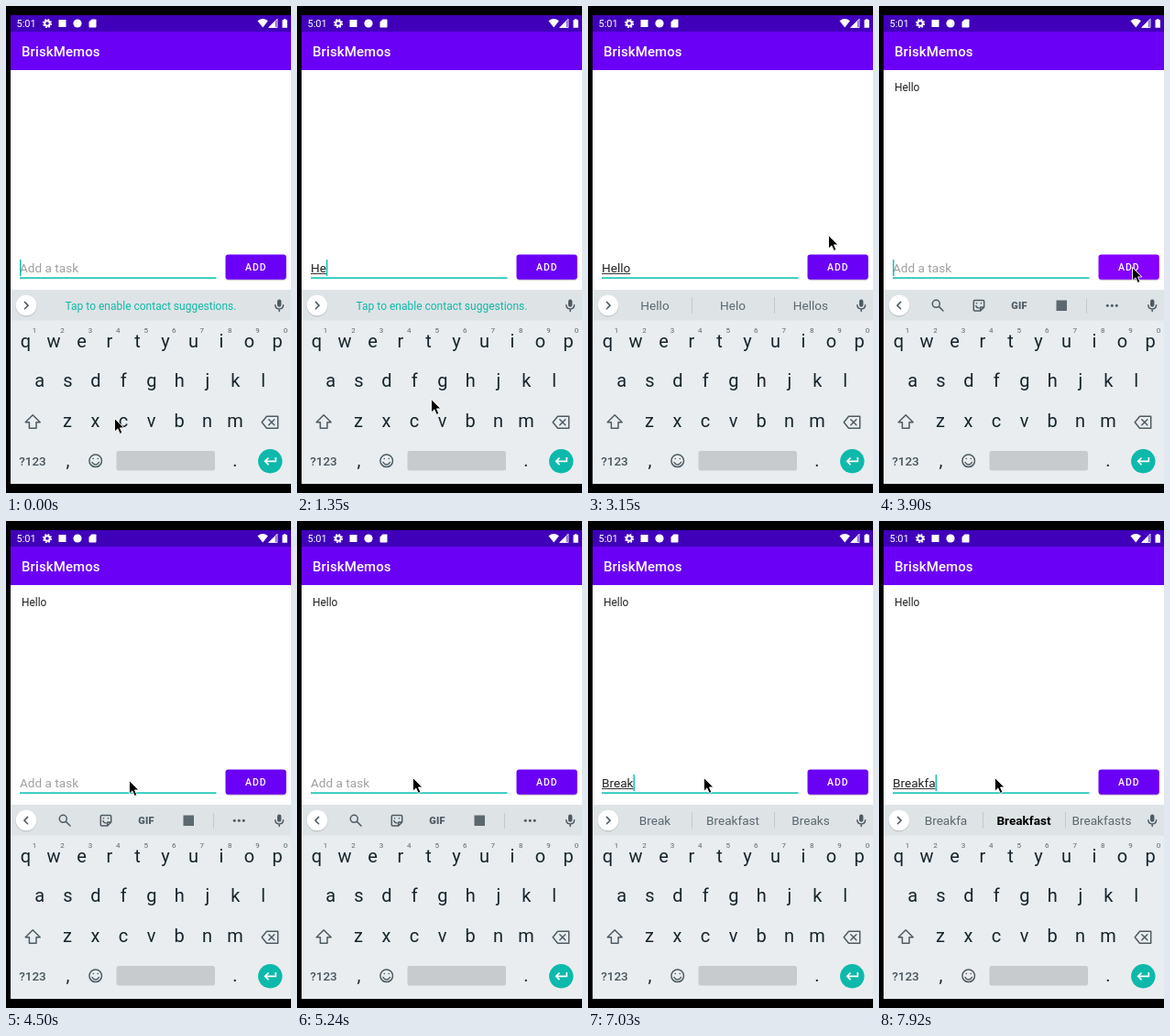
An HTML page that plays this animation: 311 by 532 pixels, repeating every 8000 ms.

```html
<!DOCTYPE html>
<html lang="en">
<head>
<meta charset="utf-8">
<title>Task list</title>
<style>
  html, body { margin: 0; width: 100%; height: 100%; overflow: hidden; background: #000; }
  svg { display: block; width: 311px; height: 532px; font-family: Roboto, "Noto Sans", sans-serif; }
  .mid { text-anchor: middle; }
  .key { font-size: 20px; fill: #17252c; }
  .num { font-size: 8px; fill: #56646b; }
  .word { font-size: 13.6px; fill: #5a686f; }
  .word.best { font-weight: 700; fill: #000; }
  .line { fill: none; stroke: #4d5b62; stroke-width: 1.5; stroke-linejoin: round; stroke-linecap: round; }
  .input { font-size: 13.6px; }
</style>
</head>
<body>
<svg viewBox="0 0 311 532">
  <rect width="311" height="532"/>
  <rect x="5" y="10" width="306" height="512" fill="#fff"/>
  <rect x="5" y="28" width="306" height="42" fill="#6b00f6"/>
  <rect x="5" y="10" width="306" height="18" fill="#4000ba"/>

  <!-- status bar -->
  <g fill="#fff">
    <text x="11.5" y="23" font-size="11">5:01</text>
    <circle cx="45" cy="19" r="2.8" fill="none" stroke="#fff" stroke-width="2"/>
    <circle cx="45" cy="19" r="4.3" fill="none" stroke="#fff" stroke-width="1.5" stroke-dasharray="1.9 1.477"/>
    <rect x="57.5" y="15" width="8" height="8"/>
    <circle cx="78" cy="19" r="4.6"/>
    <path d="M93.5 14.5h4.2q.8 0 .8 .8v7.4q0 .8-.8 .8h-6.4q-.8 0-.8-.8v-5.2z"/>
    <path d="M274.5 16.2q5.7-4.2 11.4 0l-5.7 7.3z"/>
    <path d="M296 14.2v9.3h-9.3z" fill-opacity=".35"/>
    <path d="M294 16.2v7.3h-7.3z"/>
    <path d="M296 14.2v9.3h-9.3z" fill="none" stroke="#fff" stroke-width=".8"/>
    <path d="M301.5 15.3h1.4v-1.1h2.6v1.1h1.4v8.4h-5.4z"/>
  </g>
  <text x="17" y="55" font-size="15" font-weight="500" fill="#fff" letter-spacing=".1">BriskMemos</text>

  <!-- list and entry field -->
  <text id="item" x="17" y="92.5" font-size="11.9" fill="#222">Hello</text>
  <text id="hint" class="input" x="15" y="291" fill="#a0a0a0">Add a task</text>
  <text id="typed" class="input" x="15" y="291" fill="#222"></text>
  <rect id="under" x="15" y="292" height="1" fill="#333"/>
  <rect x="15" y="296.3" width="214.5" height="1.6" fill="#12c2b2"/>
  <rect id="caret" y="277" width="1.5" height="18" fill="#12c2b2"/>
  <rect x="240" y="273" width="65.5" height="27" rx="3" fill="#000" opacity=".18"/>
  <rect id="button" x="239.5" y="271.5" width="66.3" height="27.3" rx="3"/>
  <text x="261" y="289.2" font-size="10.5" font-weight="500" fill="#fff" letter-spacing="1">ADD</text>

  <!-- keyboard -->
  <rect x="5" y="310" width="306" height="34" fill="#dee3e6"/>
  <rect x="5" y="343.5" width="306" height="178.5" fill="#e9edf0"/>
  <g id="keys"></g>

  <circle cx="22" cy="327.8" r="11.6" fill="#000" opacity=".14"/>
  <circle cx="22" cy="327" r="11.3" fill="#fff"/>
  <path id="chevron" class="line"/>
  <rect x="296" y="320.5" width="4.4" height="8.3" rx="2.2" fill="#4d5b62"/>
  <path class="line" d="M293.8 326.8q.2 4.2 4.4 4.2t4.4-4.2M298.2 331v2.6" stroke-width="1.3"/>

  <text id="tip" class="mid" x="158" y="332" font-size="12" fill="#0fb8a9">Tap to enable contact suggestions.</text>
  <g id="words">
    <path d="M113.5 318v18M203.5 318v18" stroke="#c3c9cd"/>
    <text class="word mid" x="73" y="332"></text>
    <text class="word mid" x="158" y="332"></text>
    <text class="word mid" x="243" y="332"></text>
  </g>
  <g id="tools">
    <circle class="line" cx="62.3" cy="325.3" r="4"/>
    <path class="line" d="M65.4 328.4l4.6 4.6" stroke-width="1.8"/>
    <path class="line" d="M104.5 321.5h9q1.2 0 1.2 1.2v6.3l-4 4h-6.2q-1.2 0-1.2-1.2v-9.1q0-1.2 1.2-1.2zM110.7 333v-4h4M105.8 327.6q1 2.4 3.2 2.4M106.4 324.8h.2M111.4 324.8h.2" stroke-width="1.3"/>
    <text class="mid" x="153" y="331" font-size="11" font-weight="900" fill="#4d5b62" letter-spacing=".3">GIF</text>
    <rect x="193.5" y="321.5" width="11.5" height="11.5" fill="#5b696f"/>
    <path d="M226.5 319v17" stroke="#c3c9cd"/>
    <g fill="#4d5b62"><circle cx="249.3" cy="327.3" r="1.5"/><circle cx="254.3" cy="327.3" r="1.5"/><circle cx="259.3" cy="327.3" r="1.5"/></g>
  </g>

  <path class="line" d="M29.2 446.8l8 8h-4.2v6.4h-7.6v-6.4h-4.2z"/>
  <path class="line" d="M284.5 448.3h12.2v13h-12.2l-5.3-6.5zM286.8 451.8l6 6M292.8 451.8l-6 6"/>
  <text class="mid" x="29" y="502" font-size="13.5" font-weight="500" fill="#46545b">?123</text>
  <circle class="line" cx="97.7" cy="496.8" r="6.8"/>
  <path class="line" d="M94 498.5q1.2 2.4 3.7 2.4t3.7-2.4M95.2 494.6h.1M100.2 494.6h.1"/>
  <rect x="120.5" y="486" width="107.5" height="21.5" rx="2.5" fill="#c7cbce"/>
  <circle cx="288.3" cy="497.3" r="13.2" fill="#0db9aa"/>
  <path d="M294.3 493v4.3h-11.3M286.5 493.5l-3.8 3.8 3.8 3.8" fill="none" stroke="#fff" stroke-width="1.7"/>

  <path id="pointer" d="M.5 .5v14.6l3.4-3.2 2.4 5.5 2.6-1.1-2.4-5.4h4.4z" stroke="#fff" stroke-width=".9"/>
</svg>
<script>
const LOOP = 8000;
const $ = id => document.getElementById(id);

// Each track: [start ms, value...], held until the next entry.
const entries = [
  [0, ""], [1350, "He"], [1950, "Hel"], [2100, "Hell"], [2400, "Hello"], [3750, ""],
  [5690, "B"], [5990, "Br"], [6290, "Bre"], [6580, "Brea"], [7030, "Break"],
  [7480, "Breakf"], [7920, "Breakfa"]
];
// "*" marks the highlighted suggestion.
const bars = [
  [0, "tip"],
  [1950, "Hel", "*Hello", "Help"],
  [2100, "Hell", "*Hello", "Help"],
  [2400, "Hello", "Helo", "Hellos"],
  [3750, "tools"],
  [5690, "B", "*Be", "But"],
  [5990, "Br", "*Be", "Bring"],
  [6290, "Bre", "*Are", "Breakfast"],
  [6580, "Brea", "*Bread", "Breakfast"],
  [7030, "Break", "Breakfast", "Breaks"],
  [7620, "Breakf", "*Breakfast", "Breakfasts"],
  [7920, "Breakfa", "*Breakfast", "Breakfasts"]
];
const blinks = [
  [0, 1], [450, 0], [1050, 1], [3000, 0], [3450, 1], [3600, 1],
  [4350, 0], [4800, 1], [5240, 0], [5690, 1]
];
const moves = [
  [0, 118, 450], [150, 146, 429],
  [2700, 172, 372], [2850, 216, 284], [3000, 250, 206], [3150, 262, 250],
  [3300, 269, 271], [3450, 274, 282], [3600, 276, 285],
  [4050, 268, 286], [4200, 228, 286], [4350, 168, 285], [4500, 134, 283],
  [4650, 125, 281], [4800, 125, 280], [5100, 126, 280]
];
const fills = [[0, "#6b00f6"], [3750, "#7a00fb"], [3900, "#8600ff"], [4050, "#7900fb"], [4200, "#6b00f6"]];

const at = (track, t) => track.findLast(step => step[0] <= t).slice(1);
const show = (id, on) => $(id).setAttribute("visibility", on ? "visible" : "hidden");

function label(text, x, y, kind) {
  const el = document.createElementNS("http://www.w3.org/2000/svg", "text");
  el.setAttribute("class", kind + " mid");
  el.setAttribute("x", x);
  el.setAttribute("y", y);
  el.textContent = text;
  $("keys").append(el);
}

[["qwertyuiop", 21.5, 372.5], ["asdfghjkl", 36.8, 416], ["zxcvbnm", 67, 460]].forEach(([row, x, y]) =>
  [...row].forEach((c, i) => label(c, x + i * 30.5, y, "key")));
for (let i = 0; i < 10; i++) label((i + 1) % 10, 31 + i * 30.45, 357, "num");
label(",", 67.5, 503, "key");
label(".", 250, 503, "key");

const words = [...document.querySelectorAll(".word")];

function draw(t) {
  const [text] = at(entries, t);
  const bar = at(bars, t);
  const [x, y] = at(moves, t);
  const tools = bar[0] === "tools";

  $("typed").textContent = text;
  const width = text ? $("typed").getComputedTextLength() : 0;
  $("under").setAttribute("width", width);
  $("caret").setAttribute("x", 15 + width);
  show("caret", at(blinks, t)[0]);
  show("hint", !text);
  show("item", t >= 3750);

  show("tip", bar[0] === "tip");
  show("tools", tools);
  show("words", bar.length === 3);
  if (bar.length === 3) words.forEach((el, i) => {
    el.textContent = bar[i].replace("*", "");
    el.classList.toggle("best", bar[i][0] === "*");
  });
  $("chevron").setAttribute("d", tools ? "M23.6 323.4l-3.7 3.7 3.7 3.7" : "M20.4 323.4l3.7 3.7-3.7 3.7");

  $("button").setAttribute("fill", at(fills, t)[0]);
  $("pointer").setAttribute("transform", `translate(${x} ${y})`);
}

const start = performance.now();
function tick() {
  draw((performance.now() - start) % LOOP);
  requestAnimationFrame(tick);
}
tick();
</script>
</body>
</html>
```
